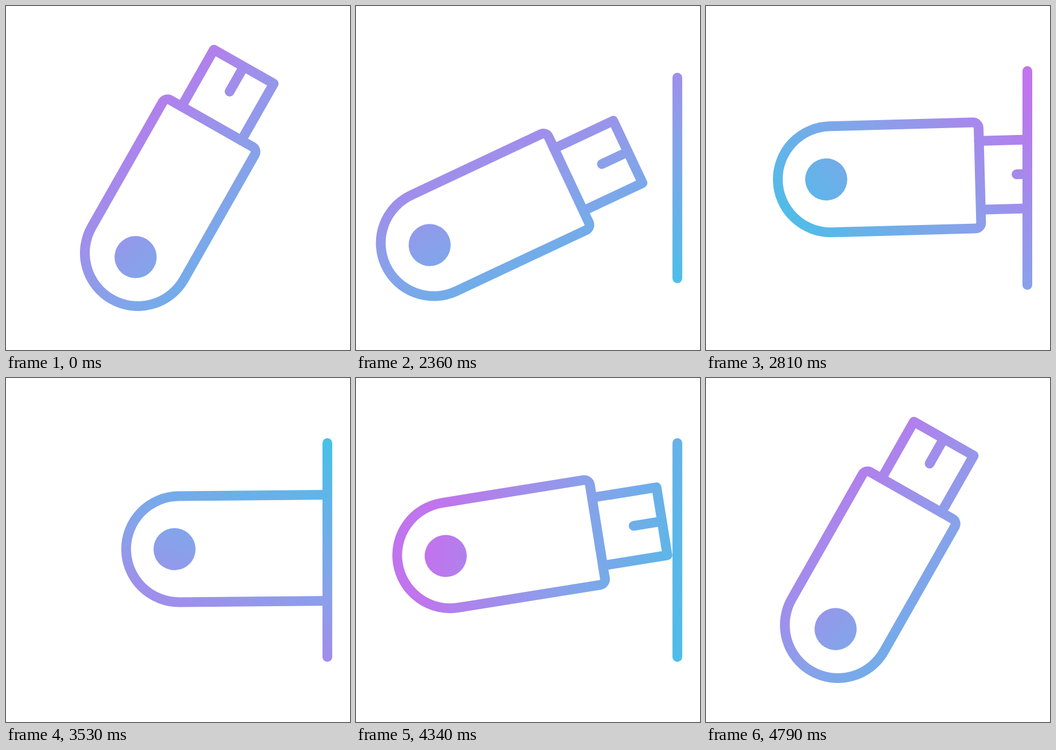
Recreate the animation shown at these times as an HTML page without scripts. Size 600 px wide and 600 px high, loop 4820 ms.

```html
<!DOCTYPE html>
<html lang="en">
<head>
<meta charset="utf-8">
<title>USB stick</title>
<style>
  html, body { margin: 0; width: 100%; height: 100%; overflow: hidden; background: #fff; }
  svg { display: block; width: 100%; height: 100%; }
  .stick, .paint, .wall { animation: 4820ms linear infinite; }
  .stick { animation-name: plug; fill: none; stroke: #fff; stroke-width: 17; stroke-linecap: round; stroke-linejoin: round; }
  .paint { animation-name: turn; transform-origin: 380px 312px; }
  .wall { animation-name: grow; }

  /* swing level, back off, push in, pull out, swing upright */
  @keyframes plug {
    0%, 41.49% { transform: translate(230px, 431px) rotate(-60.4deg); }
    42.12% { transform: translate(229.2px, 431px) rotate(-60.1deg); }
    43.57% { transform: translate(214px, 431px) rotate(-55.5deg); }
    45.64% { transform: translate(184px, 428.5px) rotate(-45deg); }
    48.96% { transform: translate(136px, 414px) rotate(-25.3deg); }
    50.83% { transform: translate(113px, 378px) rotate(-16deg); }
    52.28% { transform: translate(103.5px, 343px) rotate(-9.8deg); }
    53.32% { transform: translate(107px, 324px) rotate(-6deg); }
    54.56% { transform: translate(125px, 310px) rotate(-3.4deg); }
    55.81% { transform: translate(156px, 305px) rotate(-2.1deg); }
    58.09% { transform: translate(213px, 302.5px) rotate(-1.6deg); }
    60.17% { transform: translate(256px, 300.5px) rotate(-1deg); }
    62.24% { transform: translate(285px, 299px) rotate(-.7deg); }
    63.9% { transform: translate(298px, 298.7px) rotate(-.5deg); }
    66.39%, 75.93% { transform: translate(302px, 298.5px) rotate(-.5deg); }
    76.97% { transform: translate(300px, 298.6px) rotate(-.5deg); }
    78.84% { transform: translate(291px, 299px) rotate(-.7deg); }
    80.91% { transform: translate(272px, 300px) rotate(-1.1deg); }
    82.99% { transform: translate(247px, 301px) rotate(-1.5deg); }
    85.06% { transform: translate(221px, 302.5px) rotate(-1.9deg); }
    87.55% { transform: translate(191px, 304px) rotate(-2.3deg); }
    89.21% { transform: translate(172px, 305px) rotate(-5deg); }
    90.66% { transform: translate(159px, 312px) rotate(-12deg); }
    91.7% { transform: translate(157px, 322px) rotate(-20deg); }
    93.36% { transform: translate(167px, 350px) rotate(-35deg); }
    95.44% { transform: translate(198px, 393px) rotate(-50.5deg); }
    97.51% { transform: translate(223px, 421px) rotate(-58.5deg); }
    98.76% { transform: translate(229.5px, 430px) rotate(-60.2deg); }
    99.38%, 100% { transform: translate(230px, 431px) rotate(-60.4deg); }
  }

  @keyframes turn {
    0%, 41.49% { transform: rotate(45deg); }
    45.23% { transform: rotate(52deg); }
    48.96% { transform: rotate(65deg); }
    52.28% { transform: rotate(85deg); }
    55.81% { transform: rotate(110deg); }
    62.24% { transform: rotate(178deg); }
    68.46% { transform: rotate(245deg); }
    73.24% { transform: rotate(288deg); }
    78.84% { transform: rotate(325deg); }
    87.55% { transform: rotate(365deg); }
    99.38%, 100% { transform: rotate(405deg); }
  }

  @keyframes grow {
    0%, 42.12% { y: 300px; height: 0; animation-timing-function: ease-in-out; }
    50.4%, 90.3% { y: 105px; height: 390px; animation-timing-function: ease-in-out; }
    98.4%, 100% { y: 300px; height: 0; }
  }
</style>
</head>
<body>
<svg viewBox="0 0 600 600">
  <defs>
    <linearGradient id="hue" gradientUnits="userSpaceOnUse" x1="135" y1="0" x2="625" y2="0">
      <stop offset="0" stop-color="#c074ed"/>
      <stop offset=".5" stop-color="#87a2ea"/>
      <stop offset="1" stop-color="#48c0e8"/>
    </linearGradient>
    <clipPath id="front"><rect width="560.5" height="600"/></clipPath>
    <mask id="shape" maskUnits="userSpaceOnUse" x="0" y="0" width="600" height="600">
      <g clip-path="url(#front)">
        <g class="stick">
          <path d="M0-92.5H250a10 10 0 0 1 10 10V82.5a10 10 0 0 1-10 10H0a92.5 92.5 0 0 1 0-185z"/>
          <path d="M260-60H374V60H260M374 0H324"/>
          <circle cx="-8" r="36.7" fill="#fff" stroke="none"/>
        </g>
      </g>
      <rect class="wall" x="552" y="300" width="17" height="0" rx="8.5" fill="#fff"/>
    </mask>
  </defs>
  <g mask="url(#shape)">
    <rect class="paint" x="-620" y="-688" width="2000" height="2000" fill="url(#hue)"/>
  </g>
</svg>
</body>
</html>
```
